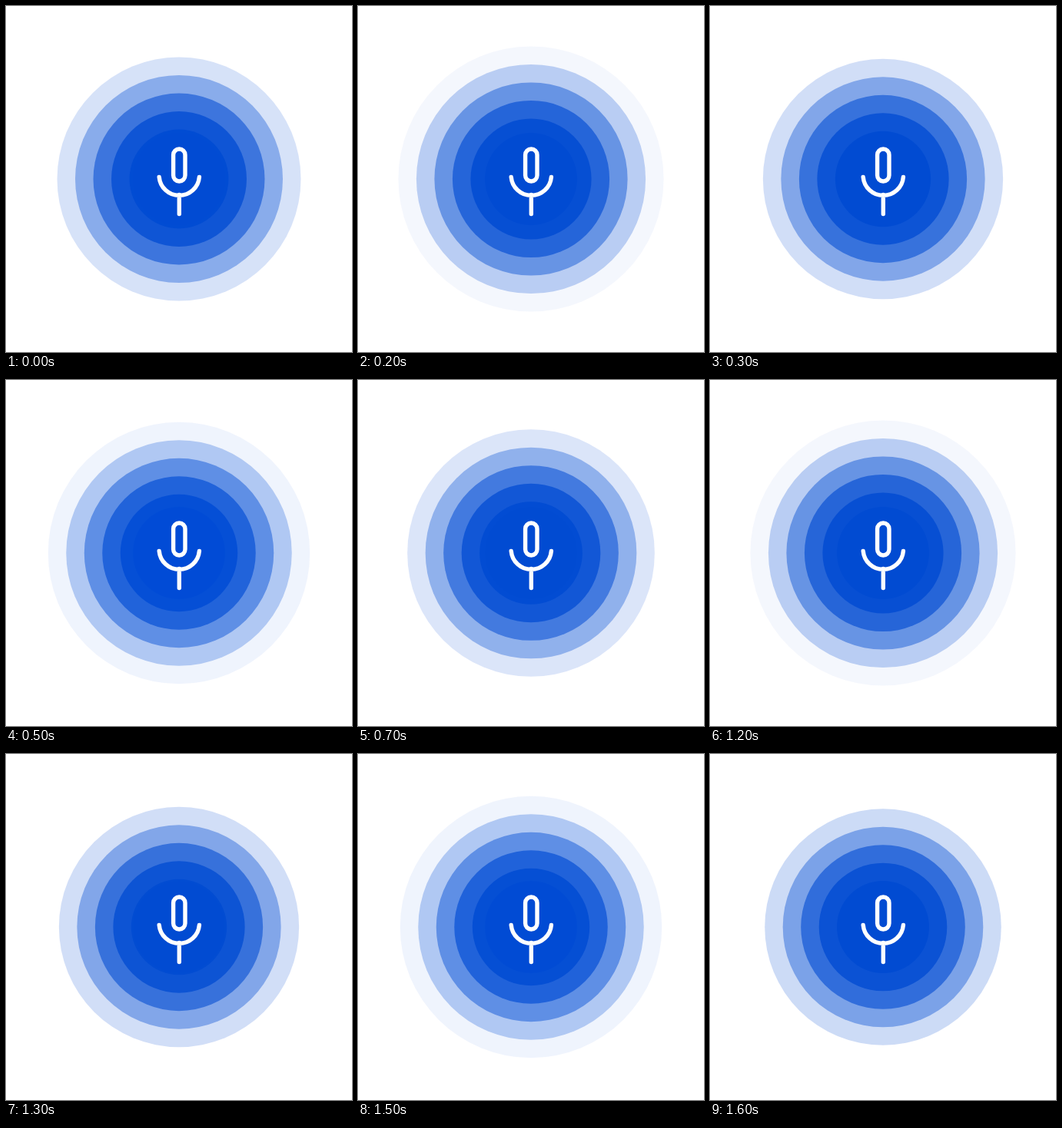
These frames come from a looping animation (450x450 px, 1700 ms). An HTML page:

```html
<!DOCTYPE html>
<html lang="en">
<head>
<meta charset="utf-8">
<title>Voice pulse</title>
<style>
  html, body { margin: 0; width: 100%; height: 100%; overflow: hidden; background: #fff; }
  svg { display: block; width: 100vw; height: 100vh; }
  #pulse { fill: #024cd3; }
  #mic { fill: none; stroke: #fff; stroke-width: 5.4; stroke-linecap: round; }
</style>
</head>
<body>
<svg viewBox="0 0 450 450">
  <g id="pulse"><circle cx="225" cy="225" r="60"/></g>
  <g id="mic">
    <rect x="217.6" y="186" width="15.4" height="42" rx="7.7"/>
    <path d="M199.2 222.5A26.2 26.2 0 0 0 251.4 222.5M225.3 245.5V270.5"/>
  </g>
</svg>
<script>
  const LOOP = 1700, STEP = 100;
  const RINGS = 5, GAP = 1000 / 3, LIFE = RINGS * GAP;
  const R_START = 60, R_GROWTH = 117.5;
  const LEAD = 1397; // age of the first ring when the loop begins

  const pulse = document.getElementById('pulse');
  const rings = Array.from({ length: RINGS }, () => {
    const ring = pulse.firstElementChild.cloneNode();
    return pulse.appendChild(ring);
  });

  function draw(ms) {
    const t = Math.floor((ms % LOOP) / STEP) * STEP;
    rings.forEach((ring, i) => {
      const p = ((t + LEAD + i * GAP) % LIFE) / LIFE;
      ring.setAttribute('r', R_START + R_GROWTH * p);
      ring.setAttribute('opacity', 1 - p);
    });
  }

  const start = performance.now();
  function tick(now) {
    draw(Math.max(0, now - start));
    requestAnimationFrame(tick);
  }
  draw(0);
  requestAnimationFrame(tick);
</script>
</body>
</html>
```
